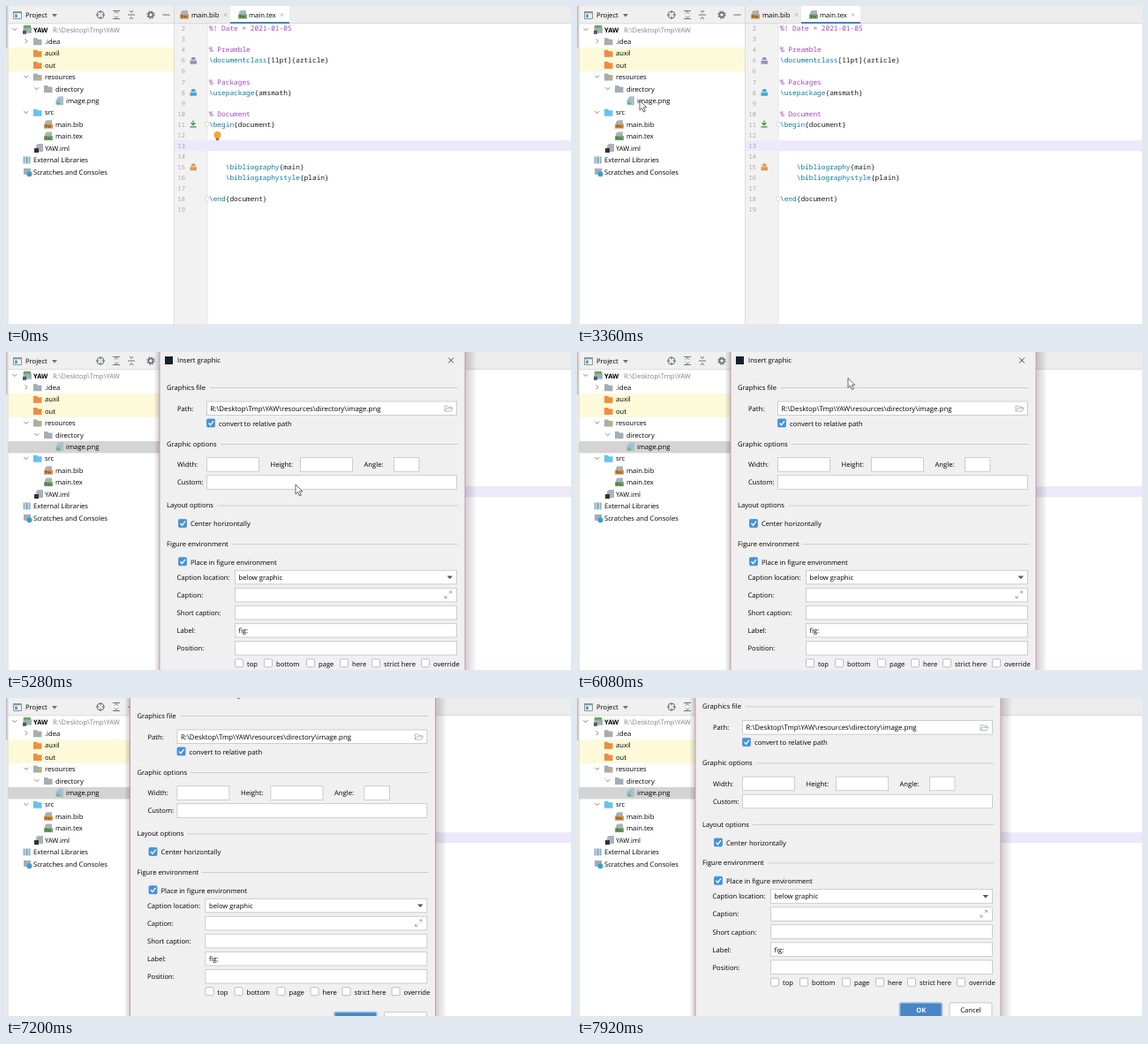
Recreate the animation shown at these times as an HTML page. Size 640 by 360 pixels, loop 8000 ms.

```html
<!DOCTYPE html>
<html lang="en">
<head>
<meta charset="utf-8">
<title>Insert graphic by drag and drop</title>
<style>
html, body { margin: 0; width: 100%; height: 100%; overflow: hidden; background: #fff; }
svg { display: block; width: 640px; height: 360px; }
text { font: 7.65px "Open Sans", "Noto Sans", sans-serif; fill: #000; white-space: pre; text-rendering: geometricPrecision; }
.bold { font-weight: 700; font-size: 7.5px; }
.wide { font-size: 7.85px; }
.dim { fill: #808080; }
.code { font: 7.8px "Noto Sans Mono", "DejaVu Sans Mono", monospace; fill: #1c1c1c; }
.command { fill: #08799c; }
.comment { fill: #9c47bd; }
.number { font: 7px "Noto Sans Mono", "DejaVu Sans Mono", monospace; fill: #a8a8a8; text-anchor: end; }
</style>
</head>
<body>
<svg id="stage" viewBox="0 0 640 360"></svg>
<script>
const LOOP = 8000, STEP = 80;
const LINE = 12.06, ROW = 13.42, CHAR = 4.69, CODE_X = 230;
const GREY = '#a3aeb6', ORANGE = '#f08c43', BLUE = '#66c3ec', CHECK = '#4593d8';
const lineY = n => 25.5 + (n - 2) * LINE;
const rowY = i => 26.8 + i * ROW;

const rect = (x, y, w, h, fill, extra = '') =>
  `<rect x="${x}" y="${y}" width="${w}" height="${h}" fill="${fill}" ${extra}/>`;
const path = (d, stroke, width = 1, fill = 'none') =>
  `<path d="${d}" stroke="${stroke}" stroke-width="${width}" fill="${fill}"/>`;
const shape = (d, fill) => `<path d="${d}" fill="${fill}"/>`;
// y is the middle of the text line
const text = (x, y, str, cls = '', extra = '') =>
  `<text x="${x}" y="${y + 2.7}" class="${cls}" ${extra}>${str}</text>`;
const group = (id, content) => `<g id="${id}">${content}</g>`;

const folder = (x, y, fill) => shape(`M${x} ${y - 4}h4l1.2 1.5h4.3v6.5h-9.5z`, fill);
const chevron = (x, y, open) =>
  path(open ? `M${x - 2.5} ${y - 1.2}l2.5 2.5 2.5-2.5` : `M${x - 1.2} ${y - 2.5}l2.5 2.5-2.5 2.5`, '#777', .9);
const cross = (x, y, r, color) =>
  path(`M${x - r} ${y - r}l${2 * r} ${2 * r}m0 ${-2 * r}l${-2 * r} ${2 * r}`, color, .8);
const texFile = (x, y, color) =>
  shape(`M${x + 3} ${y - 5}h6v5h-8v-3z`, '#a9b3bb') + rect(x, y - .5, 10, 5, color) +
  path(`M${x + 1.5} ${y + 1}h2m-1 0v2.5m2.5-2.5v2.5m2-2.5v2.5`, '#333', .7);
const imageFile = (x, y) =>
  shape(`M${x + 3.5} ${y - 5}h5v10h-7.5v-7.5z`, '#b3bec6') + rect(x, y - 1, 5, 5, '#7fc3df') +
  shape(`M${x} ${y + 4}l2-3 1.2 1.5 1-1 .8 2.5z`, '#7bad68');

function toolWindow() {
  const tree = [
    [31, 'YAW', true], [44, '.idea', false, GREY], [44, 'auxil', null, ORANGE], [44, 'out', null, ORANGE],
    [44, 'resources', true, GREY], [56, 'directory', true, GREY], [68, 'image.png'],
    [44, 'src', true, BLUE], [56, 'main.bib'], [56, 'main.tex'], [44, 'YAW.iml'],
    [31, 'External Libraries'], [31, 'Scratches and Consoles']
  ];
  let s = rect(2, 0, 189, 360, '#fff') + rect(2, rowY(2) - 6.6, 188, 2 * ROW, '#fcfad9') +
    rect(2, rowY(6) - 6.3, 188.5, ROW, '#d4d4d4', 'id="selection"');
  tree.forEach(([x, label, open, color], i) => {
    const y = rowY(i);
    if (typeof open === 'boolean') s += chevron(x - 21.2, y - .5, open);
    if (color) s += folder(x - 13, y, color);
    s += text(x, y, label, i ? '' : 'bold');
  });
  s += text(53, rowY(0), 'R:\\Desktop\\Tmp\\YAW', 'dim');
  s += folder(19.5, rowY(0), GREY) + rect(19, rowY(0) + 1, 4, 4, '#4d5a60') + rect(20, rowY(0) - 5, 8, 3, '#67a85a');
  s += path(`M35 ${rowY(4)}h5.5m-5.5 2h5.5`, '#d8b24a', .9);
  s += imageFile(56.5, rowY(6)) + texFile(43, rowY(8), '#d99043') + texFile(43, rowY(9), '#72a865');
  s += shape(`M36 ${rowY(10) - 5}h6v9h-8v-7z`, '#a9b3bb') + rect(32, rowY(10), 5, 5, '#333');
  s += [0, 3, 6].map(d => rect(19.5 + d, rowY(11) - 4, 2.2, 8, d === 3 ? '#59a9cf' : GREY)).join('');
  s += rect(20, rowY(12) - 4, 8, 7, GREY) + `<circle cx="26.5" cy="${rowY(12) + 2.5}" r="3" fill="#3b9fcb"/>`;

  s += rect(0, 0, 191, 20, '#f0f0f0') + rect(2, 19.5, 189, .7, '#d3d3d3');
  s += path('M8.5 6.5h9v8h-9z', '#8b969d') + rect(8, 6, 10, 2.2, '#8b969d') + rect(10, 9.5, 3, 3.5, '#4aa5d2');
  s += text(22, 10.5, 'Project') + shape('M52 9h6l-3 3.5z', '#6e6e6e');
  const ink = '#6b7378';
  s += `<circle cx="107" cy="10" r="4" fill="none" stroke="${ink}"/>` + path('M107 5v3.5m0 3v3.5m-5-5h3.5m3 0h3.5', ink);
  s += path('M121 5.5h8m-8 9h8m-6-6l2-2 2 2m-4 3l2 2 2-2', ink);
  s += path('M138 10h8m-6-5l2 2.5 2-2.5m-4 10l2-2.5 2 2.5', ink);
  s += `<circle cx="164" cy="10" r="2.6" fill="none" stroke="${ink}" stroke-width="1.6"/>` +
    `<circle cx="164" cy="10" r="4" fill="none" stroke="${ink}" stroke-width="1.3" stroke-dasharray="1.6 1.54"/>`;
  s += path('M177.5 10h8', ink);
  s += rect(0, 0, 2, 360, '#ededed') + rect(0, 0, 1.6, 48, '#bdbdbd') + rect(1.7, 0, .8, 360, '#cfcfcf');
  return s + rect(190.3, 0, .9, 360, '#cfcfcf');
}

function editor() {
  const code = {
    2: '%! Date = 2021-01-05', 4: '% Preamble', 5: '\\documentclass[11pt]{article}',
    7: '% Packages', 8: '\\usepackage{amsmath}', 10: '% Document', 11: '\\begin{document}',
    15: '    \\bibliography{main}', 16: '    \\bibliographystyle{plain}', 18: '\\end{document}'
  };
  const box = (y, color) => shape(`M208.5 ${y + 4}v-4h7.5v4zM209.5 ${y - .8}l1-3h3.5l1 3z`, color);
  let s = rect(191, 20, 37, 340, '#f2f2f2') + rect(227.8, 20, .6, 340, '#dcdcdc') +
    rect(191, 0, 449, LINE, '#ede8fa', 'id="caretLine"');
  s += group('braces', [11, 19].map(i => rect(CODE_X + i * CHAR, lineY(8) - 5.5, CHAR, 11, '#a5d2f5')).join(''));
  for (let n = 2; n < 20; n++) {
    s += text(203, lineY(n), n === 5 ? 6 : n, 'number');
    if (!code[n]) continue;
    const html = code[n].replace(/\\[a-z]+/, m => `<tspan class="command">${m}</tspan>`);
    s += text(CODE_X, lineY(n), html, code[n][0] === '%' ? 'code comment' : 'code');
  }
  s += box(lineY(5), '#9a8fc0') + box(lineY(8), '#4ca6d3') + box(lineY(15), '#d99a55');
  s += path(`M212 ${lineY(11) - 4.5}v5m-2.5-2.3l2.5 2.5 2.5-2.5m-6 4.6h7`, '#3b8d45', 1.1);
  s += [11, 18].map(n => path(`M226 ${lineY(n) - 2.5}h4v3.5l-2 1.8-2-1.8z`, '#c4c4c4', .6, '#fff')).join('');
  s += rect(0, -5.5, 1, 11, '#111', 'id="caret"');
  s += group('bulb', '<circle cx="239.5" cy="146" r="4" fill="#f0a732"/>' + rect(237.8, 149.4, 3.4, 2.8, '#8b7a55'));

  s += rect(191, 0, 449, 20, '#ececec') + rect(254, 0, 67, 20, '#fff') + rect(191, 19.4, 449, .7, '#d3d3d3');
  s += texFile(197, 10, '#d99043') + text(210, 10.5, 'main.bib') + cross(248.5, 10, 1.8, '#aaa');
  s += texFile(263, 10, '#72a865') + text(275, 10.5, 'main.tex') + cross(312.5, 10, 1.8, '#aaa');
  return s + rect(254, 18, 67, 2, '#4083c9', 'id="tabLine"');
}

function dialog() {
  const field = (x, y, w) => rect(x + .4, y - 8, w, 15.6, '#fff', 'stroke="#c4c4c4" stroke-width=".8"');
  const check = (x, y, on) =>
    rect(x + .5, y - 4.6, 9, 9, on ? CHECK : '#fff', `rx="1" stroke="${on ? CHECK : '#b0b0b0'}" stroke-width=".8"`) +
    (on ? path(`M${x + 2.5} ${y}l2 2.2 3.5-4.6`, '#fff', 1.3) : '');
  const section = (y, label, lineX) => text(182, y, label) + rect(lineX, y, 512 - lineX, .8, '#c6c6c6');
  const tick = (x, y, label) => check(x, y, true) + text(x + 14, y + .5, label);

  // soft shadow, reaching twice as far to the right as to the left
  let s = [6, 5, 4, 3, 2, 1].map(d => rect(174 - d, -8, 346 + 3 * d, 428 + d, '#000', `rx="${d}" opacity=".03"`)).join('');
  s += rect(174, -8, 346, 428, '#f0f0f0', 'stroke="#c78fa4" stroke-width=".9"');
  s += rect(180, 5, 9, 9, '#17212e') + text(194, 9.5, 'Insert graphic') + cross(504, 9.5, 3, '#222');

  s += section(40, 'Graphics file', 231) + text(194, 64, 'Path:') + field(227, 64, 283) +
    text(231.5, 64, 'R:\\Desktop\\Tmp\\YAW\\resources\\directory\\image.png', 'wide');
  s += path('M497 67v-6h3l1 1.3h4v1.5m-8 3.2l1.8-3.2h7.2l-1.8 3.2z', '#a5adb2', .8);
  s += tick(227, 80.5, 'convert to relative path');

  s += section(104, 'Graphic options', 243);
  s += [['Width:', 194, 227, 59], ['Height:', 299.5, 333, 59], ['Angle:', 405.5, 439, 28.5]]
    .map(([label, x, fx, w]) => text(x, 127.7, label) + field(fx, 127.7, w)).join('');
  s += text(194, 147.7, 'Custom:') + field(227, 147.7, 283);

  s += section(173.5, 'Layout options', 239) + tick(195, 194, 'Center horizontally');
  s += section(217, 'Figure environment', 256) + tick(195, 237.3, 'Place in figure environment');
  ['Caption location:', 'Caption:', 'Short caption:', 'Label:', 'Position:'].forEach((label, i) => {
    const y = 255.2 + i * 20.05;
    s += text(193.5, y, label) + field(259, y, 251);
  });
  s += text(263.5, 255.2, 'below graphic') + shape('M499.5 253.5h6.5l-3.2 3.6z', '#555') + text(263.5, 315.3, 'fig:');
  s += path('M501.5 273.5l3-2.5m-2.8 0h2.8v2.6m-4.5 2.4l-3 2.5m2.8 0h-2.8v-2.6', '#999', .8);
  s += [[259, 'top'], [292, 'bottom'], [340, 'page'], [378, 'here'], [414, 'strict here'], [470, 'override']]
    .map(([x, label]) => check(x, 352.3) + text(x + 14, 352.8, label)).join('');

  s += rect(405.5, 375.5, 48, 16, '#4a86c4', 'rx="2" stroke="#9fc4ea" stroke-width="1.6"') +
    text(429.7, 383.5, 'OK', 'bold', 'text-anchor="middle" style="fill:#fff"');
  return s + rect(462, 375.5, 48, 16, '#fff', 'rx="2" stroke="#bcbcbc" stroke-width=".8"') +
    text(486, 383.5, 'Cancel', '', 'text-anchor="middle"');
}

function mouse() {
  const arrow = path('M0 0v10.8l2.5-2.3 1.9 4.4 1.9-.8-1.9-4.3h3.5z', '#444', .8, '#fff');
  const beam = path('M-2.5-6.3h2l.5.5.5-.5h2M0-6v12M-2.5 6.3h2l.5-.5.5.5h2', '#444', .9);
  const tag = rect(14, 2.5, 47, 14.5, '#efefef') + imageFile(4, 9.5) + text(18.5, 9.8, 'image.png') +
    rect(2, 11.5, 8.5, 5, '#fff', 'stroke="#555" stroke-width=".9"');
  return group('tag', tag) + group('arrow', arrow) + group('beam', beam);
}

document.getElementById('stage').innerHTML =
  toolWindow() + editor() + group('dialog', dialog()) + group('mouse', mouse());
const part = Object.fromEntries([...document.querySelectorAll('#stage [id]')].map(el => [el.id, el]));

const show = (el, on) => el.setAttribute('visibility', on ? 'visible' : 'hidden');
const place = (el, x, y) => el.setAttribute('transform', `translate(${x} ${y})`);

// keys: [time, x, y]
function along(keys, t) {
  const next = keys.findIndex(k => k[0] > t);
  if (next < 0) return keys.at(-1).slice(1);
  if (next === 0) return keys[0].slice(1);
  const [a, b] = [keys[next - 1], keys[next]], u = (t - a[0]) / (b[0] - a[0]);
  return [1, 2].map(i => a[i] + (b[i] - a[i]) * u);
}

const GRAB = 6240;
const mousePath = [
  [480, 341, 158], [1200, 338, 101], [1360, 338, 101], [1600, 323, 142], [1920, 345, 151], [2240, 347, 150],
  [2480, 347, 150], [2880, 220, 152], [3280, 71, 107], [3840, 71, 107], [4320, 329, 154], [4800, 329.5, 154],
  [4960, 328, 150], [5600, 328, 150], [6080, 307, 29.5], [GRAB, 292, 8]
];
const dialogPath = [[GRAB, 0, 0], [6560, -23, -9], [7200, -33.5, -20], [7440, -37, -24.5], [7920, -40, -30.5]];

function draw(t) {
  const onPackage = t >= 1360 && t < 2000, dragging = t >= 3840 && t < 4960;
  const [dx, dy] = along(dialogPath, t);
  const [mx, my] = along(mousePath, t);

  part.caretLine.setAttribute('y', lineY(onPackage ? 8 : 13) - LINE / 2);
  show(part.braces, onPackage);
  show(part.bulb, t < 1360);
  show(part.caret, onPackage || (t >= 2000 && t < 2480) || (dragging && mx > 228));
  place(part.caret, onPackage ? CODE_X + 20 * CHAR - .3 : 248.5, lineY(onPackage ? 8 : 13));
  show(part.selection, t >= 3520);
  part.tabLine.setAttribute('fill', t < 3520 ? '#4083c9' : '#9ca7b8');

  show(part.dialog, t >= 5120);
  place(part.dialog, dx, dy);

  const beam = t < 3360 && mx > 191, visible = t >= 480;
  place(part.mouse, mx + dx, my + dy);
  show(part.beam, visible && beam);
  show(part.arrow, visible && !beam);
  show(part.tag, dragging);
}

function tick(now) {
  const t = now % LOOP;
  draw(t - t % STEP);
  requestAnimationFrame(tick);
}
draw(0);
requestAnimationFrame(tick);
</script>
</body>
</html>
```
